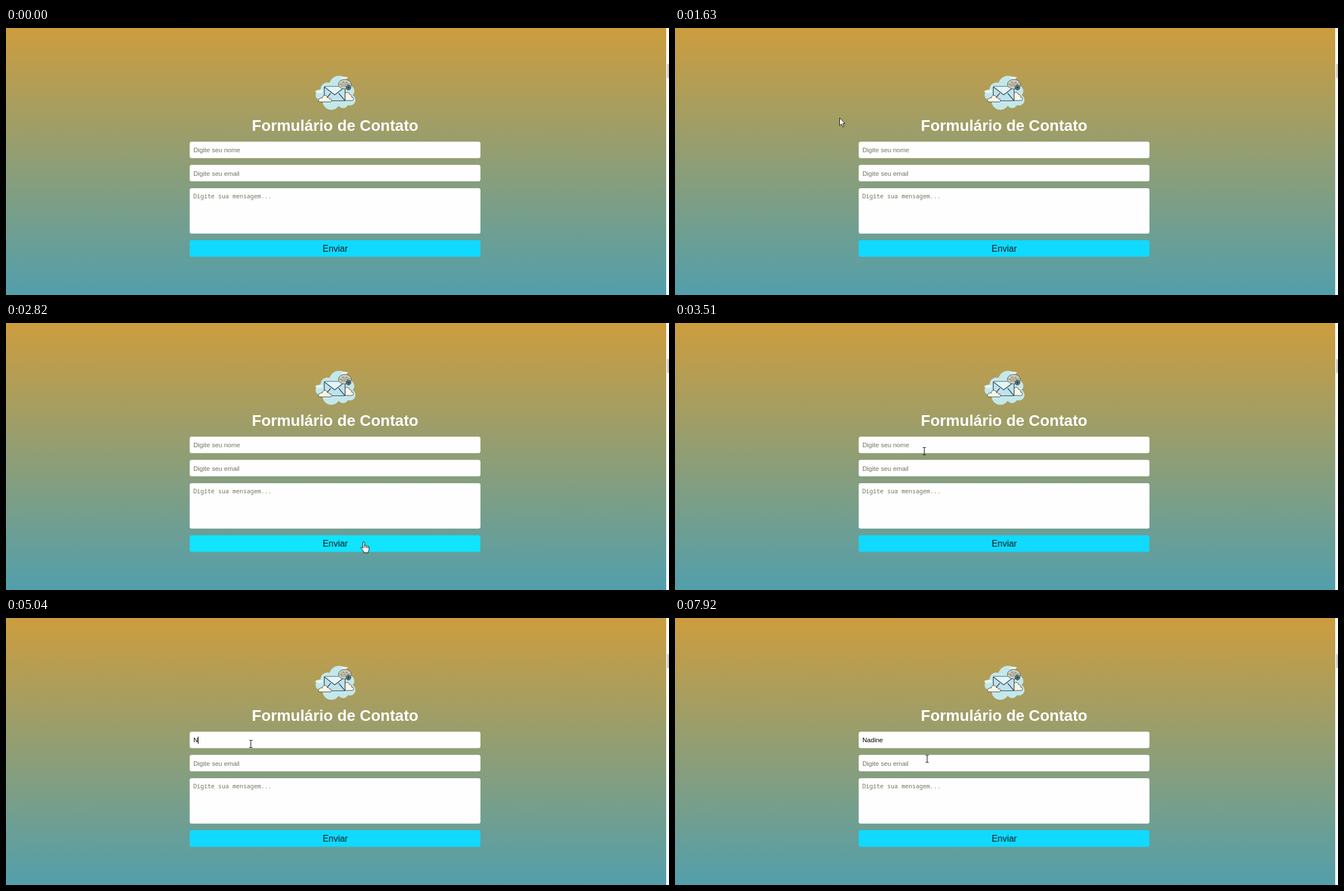
Write an HTML page that moves like this. It is 1178 px wide and 475 px high and loops after 7990 ms.

```html
<!DOCTYPE html>
<html lang="pt-BR">
<head>
<meta charset="utf-8">
<title>Formulário de Contato</title>
<style>
  html, body { margin: 0; width: 100%; height: 100%; overflow: hidden; }
  svg { display: block; width: 100vw; height: 100vh; }
  text { font: 11.53px "Liberation Sans", Arial, sans-serif; white-space: pre; }
  .hint { fill: #70755f; }
  .mono { font: 10.57px "Noto Sans Mono", monospace; }
  .title { font-size: 27.6px; font-weight: bold; fill: #fff; }
  .send { font-size: 15.8px; fill: #0c181d; }
  .tiny { font-size: 2.6px; fill: #444; }
  .field { fill: #fefefe; }
  .line { fill: none; stroke: #2d414b; stroke-width: 1.2; stroke-linejoin: round; }
  .puff { fill: #fbf5e6; stroke: #34444b; stroke-width: .9; stroke-linejoin: round; }
  #button { transform-box: fill-box; transform-origin: center; }
  #face { fill: #10daff; }
  #cursor > *, #caret { opacity: 0; }
</style>
</head>
<body>
<svg viewBox="0 0 1178 475">
  <defs>
    <linearGradient id="sky" x2="0" y2="1">
      <stop stop-color="#cd9d3e"/>
      <stop offset="1" stop-color="#529fac"/>
    </linearGradient>
  </defs>
  <rect width="1178" height="475" fill="url(#sky)"/>
  <rect x="1173" width="5" height="475" fill="#fcfcfc"/>
  <rect x="1174.5" y="64" width="5" height="25" rx="1.5" fill="#cbcfcb"/>

  <g id="mail">
    <g fill="#c4e8ea">
      <circle cx="592" cy="103" r="18"/>
      <circle cx="571" cy="109" r="12"/>
      <circle cx="560" cy="119" r="10"/>
      <circle cx="578" cy="130" r="15.5"/>
      <circle cx="599" cy="133" r="9.5"/>
      <circle cx="611" cy="128" r="10"/>
      <circle cx="609" cy="112" r="10"/>
      <circle cx="586" cy="117" r="22"/>
    </g>
    <path d="M549 113q4-4 8-2q4-3 7 2q-4 4-8 3q-4 0-7-3zM594 89q6-4 14-1l-6 4z" fill="#e6f5f2"/>
    <path class="puff" d="M602 129v-10a4 4 0 0 1 8-1a4 4 0 0 1 4 5a3 3 0 0 1 1 6z"/>
    <rect class="line" x="565.5" y="104" width="37" height="25.5" rx="1.5" style="fill:#bfe2ec"/>
    <path d="M566 104.500h36l-18 14.500z" fill="#e3f5f7"/>
    <path class="line" d="M566 105l18 14l18-14M566 129l11-13M602 129l-11-13"/>
    <path class="puff" d="M558 131.500a3 3 0 0 1 0-6a3 3 0 0 1 4-1a4.500 4.500 0 0 1 9-.5a3 3 0 0 1 4 2.500a2.600 2.600 0 0 1 2 5z"/>
    <ellipse cx="602" cy="100" rx="11.5" ry="8.500" fill="#cfcdb9" stroke="#555f5a"/>
    <g text-anchor="middle">
      <text class="tiny" x="602" y="97.500">Olá, tudo</text>
      <text class="tiny" x="602" y="100.500">bem com você?</text>
      <text class="tiny" x="601" y="103.500">Escreva já</text>
    </g>
    <circle cx="608.500" cy="106" r="4.300" fill="#587783" stroke="#2d414b"/>
    <circle cx="608.500" cy="106" r="1.600" fill="#23343c"/>
  </g>

  <text class="title" x="584.800" y="183" text-anchor="middle">Formulário de Contato</text>
  <rect class="field" x="326.400" y="202.300" width="516.600" height="29.200" rx="3.500"/>
  <rect class="field" x="326.400" y="243.600" width="516.600" height="29.200" rx="3.500"/>
  <rect class="field" x="326.400" y="285" width="516.600" height="80.700" rx="3.500"/>
  <text id="hint" class="hint" x="333" y="221">Digite seu nome</text>
  <text id="name" x="333" y="221"></text>
  <text class="hint" x="333" y="262.500">Digite seu email</text>
  <text class="hint mono" x="332.700" y="302.500">Digite sua mensagem...</text>
  <rect id="caret" y="211" width="1" height="13"/>

  <g id="button">
    <rect id="face" x="326.400" y="377.600" width="516.600" height="29.400" rx="3.500"/>
    <text class="send" x="585" y="398" text-anchor="middle">Enviar</text>
  </g>

  <g id="cursor">
    <path id="arrow" d="M.5.5v13.500l3.200-2.900l2.300 5.300l2.200-1l-2.300-5.100h4.300z" fill="#fff" stroke="#111"/>
    <path id="hand" d="M-1.500 12.500V2q0-1.800 1.500-1.800T1.500 2v5q2.500-1.200 3 .7q2.200-.8 2.700.8q2.300-.5 2.300 1.500v4q0 2-1.500 4v1.800h-7.500v-1.800l-4.500-5.500q-2-2.500 0-2.900q1.200 0 2.500 1.900M1.500 7v4M4.500 8v3.500M7.200 9v3" fill="#fff" stroke="#111" stroke-linejoin="round"/>
    <path id="beam" d="M-3-6.500h2.300l.7.500l.7-.5h2.300M-3 6.500h2.300l.7-.5l.7.500h2.300M0-6v12" fill="none" stroke="#222" stroke-width="1.200"/>
  </g>
</svg>
<script>
const LOOP = 7990, BLINK = 530;
const ENTER = 520, OVER_FIELDS = 1690, OVER_BUTTON = 1970, OFF_BUTTON = 2940, FOCUS = 3730;
const HOLD = 'steps(1, end)';
const byId = id => document.getElementById(id);

// Rows are [time in ms, value]; the first and last values fill the ends.
function play(el, prop, rows, easing = HOLD) {
  const full = [[0, rows[0][1]], ...rows, [LOOP, rows.at(-1)[1]]];
  el.animate(
    full.map(([time, value]) => ({ offset: time / LOOP, [prop]: value, easing })),
    { duration: LOOP, iterations: Infinity }
  );
}

const show = (id, from, to = LOOP) => play(byId(id), 'opacity', [[0, 0], [from, 1], [to, 0]]);
const move = (x, y) => `translate(${x}px, ${y}px)`;

// The pointer rests between glides of { from, to, x, y }.
function glide(el, x, y, glides) {
  const rows = [[0, move(x, y)]];
  for (const g of glides) rows.push([g.from, rows.at(-1)[1]], [g.to, move(g.x, g.y)]);
  play(el, 'transform', rows, 'linear');
}

glide(byId('cursor'), 768, 17, [
  { from: ENTER, to: 700, x: 330, y: 108 },
  { from: 700, to: 870, x: 112, y: 318 },
  { from: 870, to: 1150, x: 293, y: 165 },
  { from: 1290, to: 1630, x: 291, y: 159 },
  { from: 1630, to: 2010, x: 665.5, y: 392.5 },
  { from: 2120, to: 2820, x: 635.5, y: 389 },
  { from: 2890, to: 3510, x: 443, y: 228 },
  { from: 3850, to: 3850, x: 430, y: 221 },
  { from: 4700, to: 4770, x: 435, y: 224 },
  { from: 7450, to: 7650, x: 446, y: 229 },
  { from: 7790, to: 7920, x: 448, y: 250.5 }
]);
show('arrow', ENTER, OVER_FIELDS);
show('hand', OVER_BUTTON, OFF_BUTTON);
play(byId('beam'), 'opacity', [[0, 0], [OVER_FIELDS, 1], [OVER_BUTTON, 0], [OFF_BUTTON, 1]]);

play(byId('face'), 'fill', [[0, '#10daff'], [OVER_BUTTON, '#10e4ff'], [OFF_BUTTON, '#10daff']]);
play(byId('button'), 'transform', [
  [OVER_BUTTON, 'scale(1)'],
  [OVER_BUTTON + 400, 'scale(1.009)'],
  [OVER_BUTTON + 800, 'scale(1)']
], 'ease-in-out');

// Two quick keys, a pause, then an even pace.
const keyTime = i => i < 2 ? 5040 + 200 * i : 6180 + 247 * (i - 2);
const letters = [...'Nadine'];
const name = byId('name');
const caretRows = [[0, move(333, 0)]];
const blinkRows = [[0, 0]];

letters.forEach((letter, i) => {
  const span = document.createElementNS('http://www.w3.org/2000/svg', 'tspan');
  span.textContent = letter;
  name.append(span);
  play(span, 'fillOpacity', [[0, 0], [keyTime(i), 1]]);
  const end = Math.round(name.getEndPositionOfChar(i).x);
  caretRows.push([keyTime(i), move(end, 0)]);
});
play(byId('hint'), 'opacity', [[0, 1], [keyTime(0), 0]]);

// Every key restarts the blink with the caret visible.
const resets = [FOCUS, ...letters.map((_, i) => keyTime(i))];
resets.forEach((start, i) => {
  const end = resets[i + 1] ?? LOOP;
  for (let n = 0; start + n * BLINK < end; n++) blinkRows.push([start + n * BLINK, 1 - n % 2]);
});
play(byId('caret'), 'transform', caretRows);
play(byId('caret'), 'opacity', blinkRows);
</script>
</body>
</html>
```
